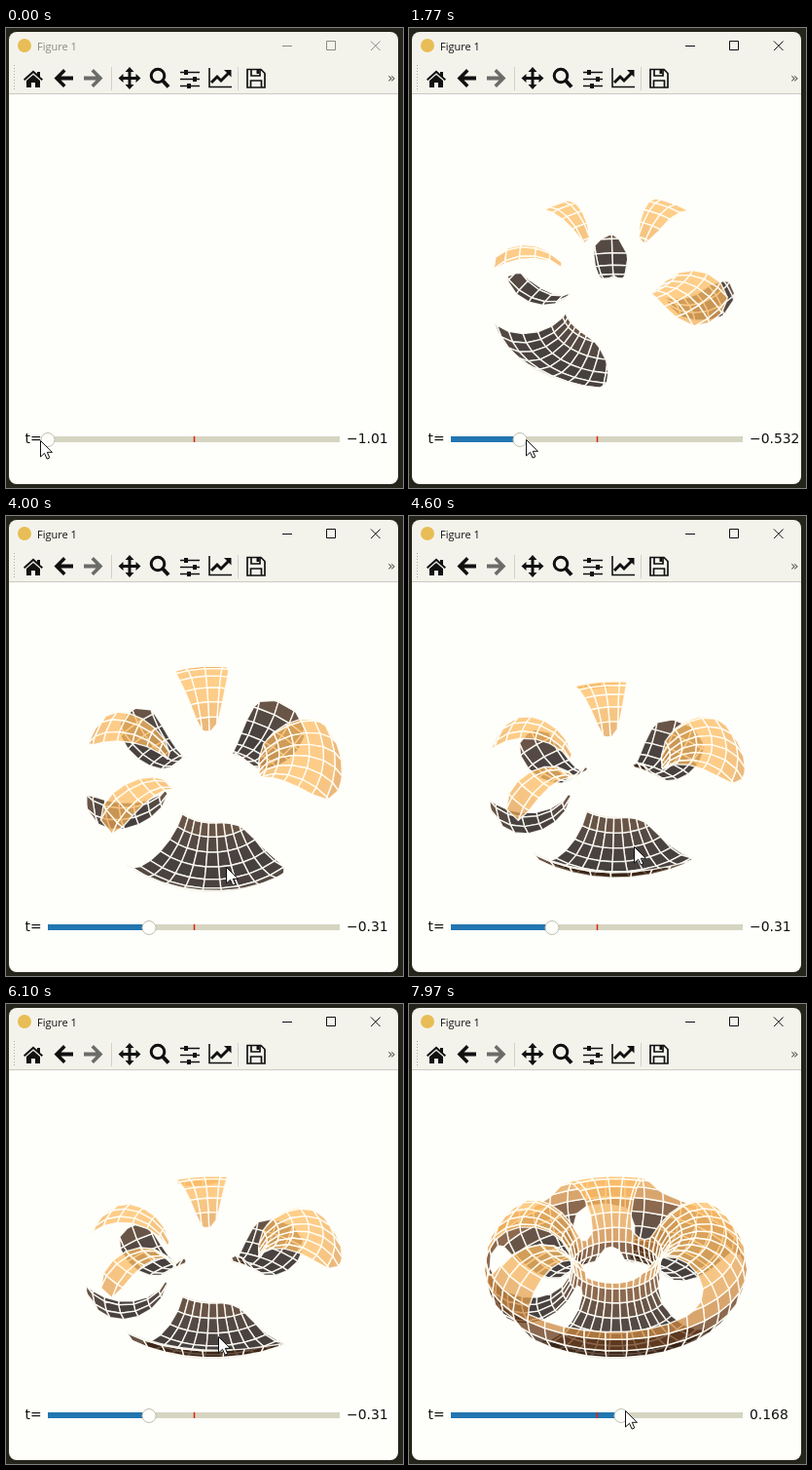
An HTML page with a canvas for the animation above (8 s loop, 408x472 px).

```html
<!DOCTYPE html>
<html lang="en">
<head>
<meta charset="utf-8">
<title>Figure 1</title>
<style>
  html, body { margin: 0; width: 100%; height: 100%; overflow: hidden; background: #25241b; }
  .window { position: absolute; left: 3px; top: 4px; width: 400px; height: 464px; border-radius: 8px;
    background: linear-gradient(#f3f3ec 63px, #cbcabc 63px 64px, #fefefb 64px); }
  canvas, svg { position: absolute; left: 0; top: 0; width: 408px; height: 472px; }
  .title { font: 11px "Open Sans", "Noto Sans", sans-serif; }
  .label { font: 13.9px "DejaVu Sans", sans-serif; }
  .line { fill: none; stroke: #111; stroke-width: 2; }
  #caption { color: #111; }
  #caption.idle { color: #8b8a80; }
</style>
</head>
<body>
<div class="window"></div>
<canvas id="plot" width="408" height="472"></canvas>
<svg viewBox="0 0 408 472" fill="#111">
  <g id="caption">
    <circle cx="19" cy="18" r="7" fill="#e9bd55"/>
    <text class="title" x="32" y="23" fill="currentColor">Figure 1</text>
    <path d="M284 18.5H294M329.5 13.5h9v9h-9zM375 13.5l9.5 9.5M384.5 13.5l-9.5 9.5" fill="none" stroke="currentColor"/>
  </g>

  <g id="toolbar">
    <path d="M8.5 38V65" stroke="#aaa99c" stroke-dasharray="1 2"/>
    <path d="M108.5 40V64M238.5 40V64" stroke="#d2d1c4"/>
    <path d="M18 52.5L28 43.5l4 3.6V45h3v5l3 2.5-1.3 1.5L28 46.3 19.3 54z"/>
    <path d="M21 54l7-6 7 6v7h-5v-5h-4v5h-5z"/>
    <path id="arrow" d="M49.5 51.5L59 42l2.5 2.5-5 5H69v4H56.5l5 5L59 61z"/>
    <use href="#arrow" transform="matrix(-1 0 0 1 149 0)" opacity=".6"/>
    <path d="M127 40l4.5 5H128.500v5H133.500V47l5 4.500-5 4.500V53H128.500v5h3L127 63l-4.500-5h3V53h-5v3l-5-4.500 5-4.500v3h5v-5h-3z"/>
    <circle class="line" cx="156" cy="49" r="6.8" style="stroke-width:3"/>
    <path class="line" d="M161 54l6 6.5" style="stroke-width:4"/>
    <path class="line" d="M179 45.5H199M179 52.5H199M179 59.5H199" style="stroke-width:1.6"/>
    <path d="M183 43h4v5h-4zM192 50h4v5h-4zM186 57h4v5h-4z"/>
    <path class="line" d="M209 41V60.5H232" style="stroke-width:1.6"/>
    <path class="line" d="M211 56l6-6 4 4 8-8" style="stroke-width:3"/>
    <path d="M224 43h7.5v7.5z"/>
    <path class="line" d="M248 42.5h14l4 4V61h-18zM252 43v6h9v-6M251.5 61v-7h11v7" style="stroke-width:1.7"/>
    <path d="M257.5 43h2.5v4h-2.5z"/>
    <text class="label" x="392" y="56" fill="#55544c">»</text>
  </g>

  <g id="slider">
    <text class="label" x="19.5" y="426">t=</text>
    <rect x="43" y="419" width="300" height="6" fill="#d6d5c2"/>
    <rect id="fill" x="43" y="419" height="6" fill="#2176b0"/>
    <path d="M193.5 419v6" stroke="#e02010" stroke-width="1.5"/>
    <circle id="knob" cy="422.5" r="7" fill="#fefefb" stroke="#c1c0b0"/>
    <text class="label" id="value" x="350" y="426"></text>
  </g>

  <path id="cursor" d="M0 0V16.5L4 12.8 6.6 18.6 9.3 17.4 6.8 11.8H12z" fill="#fff" stroke="#111"/>
</svg>
<script>
const LOOP = 8000, COLS = 40, ROWS = 18, RAD = Math.PI / 180;
const SCALE = 45, CENTER_X = 212.5, CENTER_Y = 267.5, PERSPECTIVE = 0.019;
const TRACK_X = 43, TRACK_WIDTH = 300, RANGE = 1.01;
const DRAG_START = 3070, DRAG_END = 5800;

// Pointer stops: time in ms, x, y.
const STOPS = [[0, 35, 423], [2450, 152, 422], [2950, 156, 338], [DRAG_START, 156, 338],
  [4000, 226, 360], [5370, 237, 312], [DRAG_END, 227, 330], [6000, 227, 330],
  [6800, 154, 419], [7970, 222, 417]];

const UNDER = [8, 0, 0], RIM = [168, 95, 37], TOP = [255, 190, 99];

const $ = id => document.getElementById(id);
const ctx = $("plot").getContext("2d");
const clamp = (n, low, high) => Math.min(high, Math.max(low, n));
const ramp = (at, from, to) => clamp((at - from) / (to - from), 0, 1);
const mix = (a, b, k) => a.map((n, i) => n + (b[i] - n) * k);

function pointerAt(at) {
  const next = STOPS.findIndex(stop => stop[0] > at);
  const b = STOPS.at(next), a = next < 0 ? b : STOPS[next - 1];
  return mix(a, b, ramp(at, a[0], b[0])).slice(1);
}

// Dragging on the plot turns it: across for azimuth, down for elevation.
function viewAt(at) {
  const [x, y] = pointerAt(clamp(at, DRAG_START, DRAG_END));
  return [191 + 0.545 * (x - 156), 38 + 0.65 * (y - 338)];
}

const knobAt = at => Math.round(104 * ramp(at, 300, 2450) + 71 * ramp(at, 6832, 7970));

// A torus point, with a wave that quickens around the ring as fourth value.
function vertex(col, row) {
  const u = col / COLS * 2 * Math.PI, v = row / ROWS * 2 * Math.PI;
  const rho = 2 + Math.cos(v);
  return [rho * Math.cos(u), rho * Math.sin(u), Math.sin(v), Math.cos(0.6 * u * u) * Math.sin(v)];
}

function shade(row) {
  const height = Math.sin((row + 0.5) / ROWS * 2 * Math.PI);
  const rgb = mix(RIM, height > 0 ? TOP : UNDER, Math.sqrt(Math.abs(height)));
  return `rgba(${rgb.map(Math.round)},.75)`;
}

const cells = [];
for (let col = 0; col < COLS; col++) {
  for (let row = 0; row < ROWS; row++) {
    const corners = [[0, 0], [1, 0], [1, 1], [0, 1]].map(([i, j]) => vertex(col + i, row + j));
    cells.push({ corners, color: shade(row) });
  }
}

// Keep the part of a cell whose wave value lies below the level.
function clip(corners, level) {
  const kept = [];
  corners.forEach((a, i) => {
    const b = corners[(i + 1) % corners.length];
    if (a[3] <= level) kept.push(a);
    if ((a[3] <= level) !== (b[3] <= level)) kept.push(mix(a, b, (level - a[3]) / (b[3] - a[3])));
  });
  return kept;
}

function projector(azimuth, elevation) {
  const ca = Math.cos(azimuth * RAD), sa = Math.sin(azimuth * RAD);
  const ce = Math.cos(elevation * RAD), se = Math.sin(elevation * RAD);
  return ([x, y, z]) => {
    const side = x * ca - y * sa, away = x * sa + y * ca;
    const depth = z * se - away * ce;
    const k = SCALE / (1 - depth * PERSPECTIVE);
    return [CENTER_X + k * side, CENTER_Y - k * (away * se + z * ce), depth];
  };
}

function drawSurface(level, view) {
  const project = projector(...view);
  const faces = [];
  for (const { corners, color } of cells) {
    const points = clip(corners, level).map(project);
    if (points.length < 3) continue;
    faces.push({ points, color, depth: points.reduce((sum, p) => sum + p[2], 0) / points.length });
  }
  faces.sort((a, b) => a.depth - b.depth);
  ctx.clearRect(0, 0, 408, 472);
  ctx.lineWidth = 1.4;
  ctx.lineJoin = "round";
  ctx.strokeStyle = "rgba(255,255,248,.9)";
  for (const { points, color } of faces) {
    ctx.beginPath();
    points.forEach(p => ctx.lineTo(p[0], p[1]));
    ctx.closePath();
    ctx.fillStyle = color;
    ctx.fill();
    ctx.stroke();
  }
}

function drawSlider(knob, level) {
  $("fill").setAttribute("width", knob);
  $("knob").setAttribute("cx", TRACK_X + knob);
  $("value").textContent = String(+level.toPrecision(3)).replace("-", "\u2212");
}

function frame(at) {
  const knob = knobAt(at), level = RANGE * (2 * knob / TRACK_WIDTH - 1);
  const [x, y] = pointerAt(at).map(n => Math.round(n) + 0.5);
  drawSurface(level, viewAt(at));
  drawSlider(knob, level);
  $("caption").classList.toggle("idle", at < 30);
  $("cursor").setAttribute("transform", `translate(${x} ${y})`);
}

const start = performance.now();
function tick() {
  frame((performance.now() - start) % LOOP);
  requestAnimationFrame(tick);
}
tick();
</script>
</body>
</html>
```
